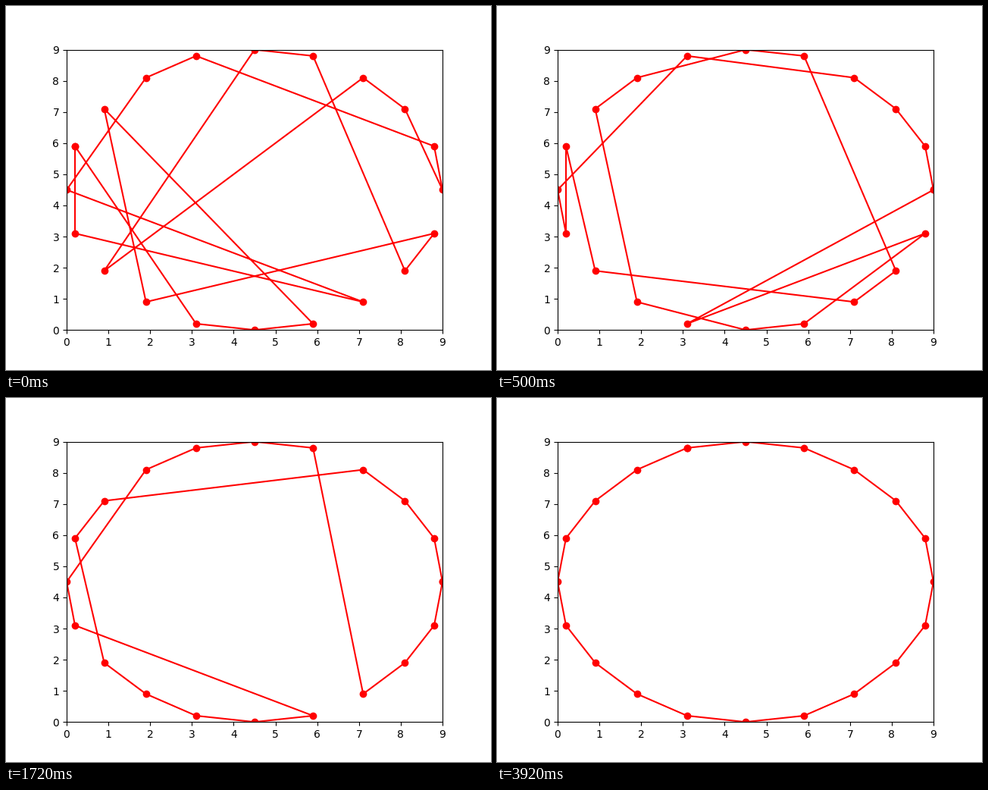
A matplotlib script that plays this animation: 640 px wide and 480 px high, repeating every 4.72 s.

```python
import numpy as np
import matplotlib.pyplot as plt
from matplotlib.animation import FuncAnimation

STEP_MS = 20
LOOP_MS = 4720
CITIES = 20

# Cities on a circle, counted anticlockwise from the right
angle = 2 * np.pi * np.arange(CITIES) / CITIES
cities = np.round(4.5 + 4.5 * np.column_stack([np.cos(angle), np.sin(angle)]), 1)


def flip(tour, a, b):
    """Reverse the stretch from a to b."""
    i, j = tour.index(a), tour.index(b)
    tour[i:j + 1] = tour[i:j + 1][::-1]


def swap(tour, a, b):
    """Exchange two cities."""
    i, j = tour.index(a), tour.index(b)
    tour[i], tour[j] = b, a


def move(tour, a, b):
    """Visit a right after b."""
    tour.remove(a)
    tour.insert(tour.index(b) + 1, a)


START = [9, 11, 17, 10, 7, 6, 1, 0, 2, 3, 12, 5, 4, 18, 19, 13, 8, 16, 15, 14]

# Time in ms, then the changes made to the tour at that moment
STEPS = [
    (20, (flip, 5, 18)),
    (60, (move, 17, 12)),
    (100, (move, 7, 5)),
    (140, (flip, 19, 8)),
    (180, (flip, 19, 15)),
    (220, (flip, 9, 3)),
    (280, (flip, 3, 1)),
    (340, (swap, 1, 2), (swap, 0, 1)),
    (500, (flip, 2, 0)),
    (640, (move, 17, 16), (move, 18, 17)),
    (780, (move, 14, 15)),
    (880, (flip, 4, 14)),
    (980, (move, 10, 13), (flip, 11, 9)),
    (1120, (move, 17, 13), (flip, 14, 13), (swap, 12, 13)),
    (1140, (move, 17, 16)),
    (1200, (move, 11, 14)),
    (1260, (swap, 15, 14)),
    (1340, (swap, 13, 12)),
    (1400, (move, 16, 15)),
    (1480, (move, 6, 7)),
    (1540, (move, 8, 3)),
    (1620, (move, 7, 3)),
    (1720, (move, 7, 10)),
    (2100, (move, 11, 9)),
    (2180, (flip, 11, 16)),
    (2260, (flip, 8, 10)),
    (3580, (swap, 9, 17), (swap, 9, 3)),
    (3780, (swap, 8, 18), (swap, 8, 2)),
    (3820, (swap, 7, 19), (swap, 7, 1)),
    (3860, (swap, 6, 0)),
    (3900, (swap, 5, 1)),
    (3920, (swap, 4, 2)),
]


def build_tours():
    tour = list(START)
    times, tours = [0], [list(tour)]
    for time, *changes in STEPS:
        for change, a, b in changes:
            change(tour, a, b)
        times.append(time)
        tours.append(list(tour))
    return times, tours


times, tours = build_tours()

fig, ax = plt.subplots(figsize=(6.4, 4.8), dpi=100)
ax.set_xlim(0, 9)
ax.set_ylim(0, 9)
ax.set_xticks(range(10))
ax.set_yticks(range(10))
path, = ax.plot([], [], "o-", color="red")


def update(frame):
    step = np.searchsorted(times, frame * STEP_MS, side="right") - 1
    tour = tours[step]
    path.set_data(*cities[tour + tour[:1]].T)
    return path,


anim = FuncAnimation(fig, update, frames=LOOP_MS // STEP_MS, interval=STEP_MS,
                     repeat=True, repeat_delay=0)
plt.show()
```
